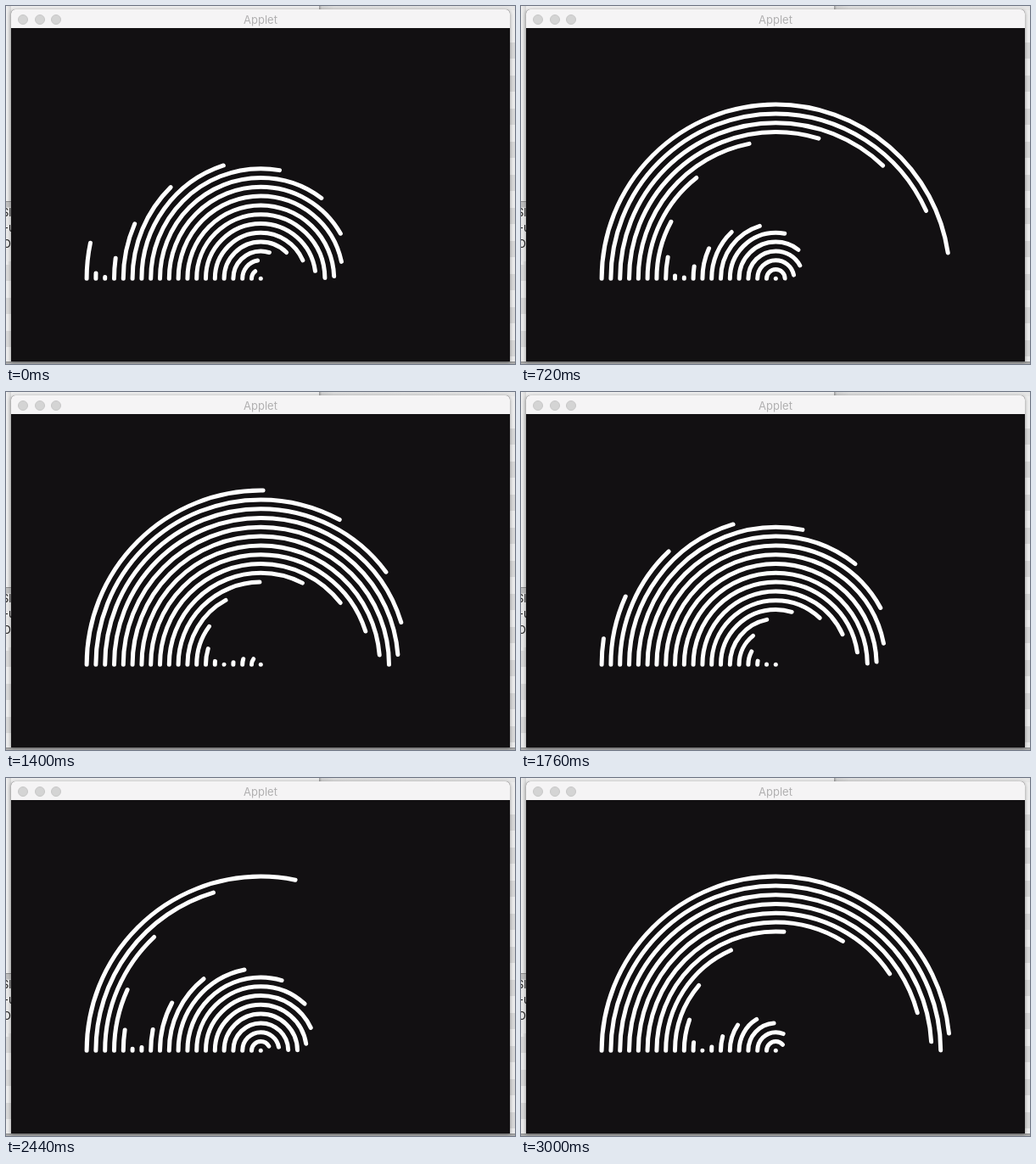
Write an HTML page with a canvas that moves like this. It is 600 px wide and 422 px high and loops after 3040 ms.

```html
<!DOCTYPE html>
<html lang="en">
<head>
<meta charset="utf-8">
<title>Applet</title>
<style>
  html, body { margin: 0; width: 100%; height: 100%; overflow: hidden; }
  body { position: relative; background: #eee; font-family: Inter, Roboto, sans-serif; }
  div, span, canvas { position: absolute; }
  .top { left: 369px; top: 0; right: 0; height: 5px; background: linear-gradient(90deg, #999, #d2d2d2 3px, #dedede 18px, #e6e6e6); }
  .left { left: 0; top: 0; width: 6px; height: 422px; overflow: hidden; background: linear-gradient(90deg, #f2f2f2, #d4d4d4); }
  .pane { top: 230px; width: 6px; height: 70px; border-top: 1px solid #8c8c8c; background: linear-gradient(#bdbdbd 6px, #e9e9e9 7px); }
  .left span { font-size: 13px; line-height: 16px; color: #222; white-space: nowrap; }
  .rows { width: 6px; background: repeating-linear-gradient(#d8d8d8 0 19.5px, #ececec 19.5px 39px); }
  .foot { left: 0; right: 0; top: 419px; height: 3px; background: linear-gradient(#8f8f8f, #b5b5b5); }
  .window { left: 6px; top: 4px; width: 588px; height: 415px; border-radius: 5px 5px 0 0; background: #121012; overflow: hidden; box-shadow: 0 1px 4px rgba(0, 0, 0, .4); }
  .bar { left: 0; top: 0; width: 100%; height: 22px; background: #f5f4f5; text-align: center; font-size: 13px; line-height: 24px; color: #b1b0b1; }
  .bar i { position: absolute; top: 6px; width: 10px; height: 10px; border: 1px solid #c8c8c8; border-radius: 50%; background: #d4d4d4; }
  canvas { left: 0; top: 0; }
</style>
</head>
<body>
<div class="top"></div>
<div class="left">
  <div class="pane"></div>
  <div class="rows" style="top: 305px; height: 117px"></div>
  <span style="left: -5px; top: 235px">Sl</span>
  <span style="left: -3px; top: 253px">-u</span>
  <span style="left: -4px; top: 272px">O</span>
</div>
<div class="rows" style="left: 594px; top: 43px; height: 379px"></div>
<div class="foot"></div>
<div class="window">
  <div class="bar">
    <i style="left: 7.5px"></i><i style="left: 27.5px"></i><i style="left: 47px"></i>Applet
  </div>
</div>
<canvas width="600" height="422"></canvas>
<script>
const ctx = document.querySelector('canvas').getContext('2d');
const LOOP = 3040, STEP = 40, RINGS = 20, GAP = 10.8;
const CX = 300.3, CY = 321.3;
const RAD = Math.PI / 180;

// [ms, degrees travelled by the wave]; the pace drifts slightly
const pace = [[0, 0], [400, 69.2], [1000, 174.2], [1400, 239.8],
  [2160, 377.7], [2680, 470.4], [3000, 530.8]];

function travelled(t) {
  const i = Math.max(1, pace.findIndex(p => p[0] >= t));
  const [t0, a] = pace[i - 1], [t1, b] = pace[i];
  return a + (b - a) * (t - t0) / (t1 - t0);
}

function draw(t) {
  const shift = travelled(t);
  ctx.clearRect(0, 0, 600, 422);
  ctx.strokeStyle = ctx.fillStyle = '#fff';
  ctx.lineWidth = 5;
  ctx.lineCap = 'round';
  ctx.beginPath();
  ctx.arc(CX, CY, 2.5, 0, 2 * Math.PI);
  ctx.fill();
  for (let k = 1; k < RINGS; k++) {
    const phase = (24.3 + 18 * (16 - k) - shift) * RAD;
    const sweep = Math.max(0.002, Math.PI / 2 * (1 - Math.cos(phase)));
    ctx.beginPath();
    ctx.arc(CX, CY, k * GAP, Math.PI, Math.PI + sweep);
    ctx.stroke();
  }
}

const start = performance.now();
function tick() {
  const t = (performance.now() - start) % LOOP;
  draw(Math.floor(t / STEP) * STEP);
  requestAnimationFrame(tick);
}
tick();
</script>
</body>
</html>
```
